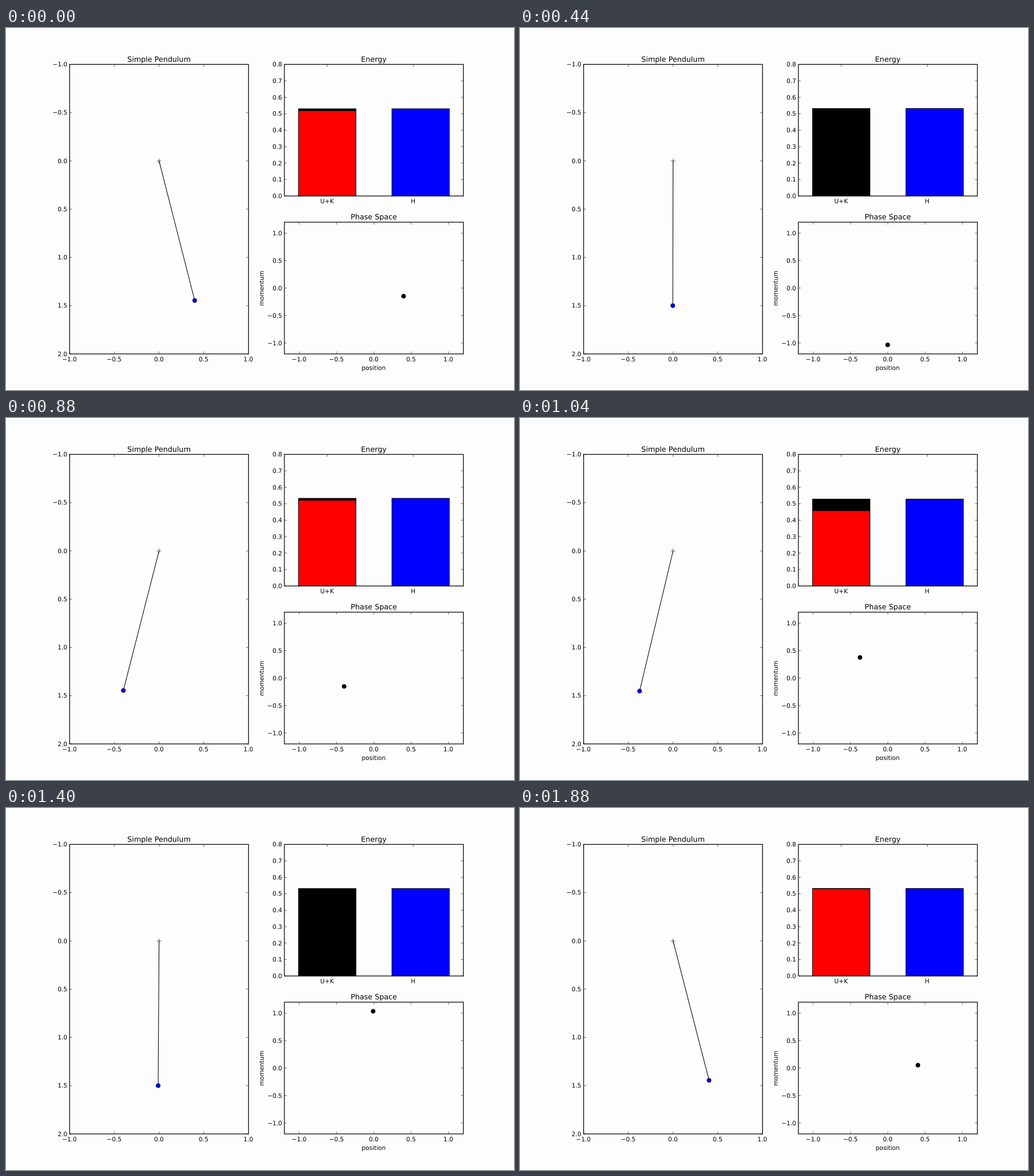
Write an HTML page that moves like this. It is 885 px wide and 632 px high and loops after 1.92 s.

```html
<!DOCTYPE html>
<html lang="en">
<head>
<meta charset="utf-8">
<title>Simple Pendulum</title>
<style>
html, body { margin: 0; width: 100%; height: 100%; overflow: hidden; background: #fdfdfd; }
svg { display: block; }
text { font: 10.6px "DejaVu Sans", sans-serif; text-anchor: middle; text-rendering: geometricPrecision; }
.title { font-size: 12.7px; }
.end { text-anchor: end; }
.box { fill: none; stroke: #000; stroke-width: 1.25; }
.thin { stroke: #000; stroke-width: .6; }
.edge { stroke: #000; stroke-width: 1.06; }
</style>
</head>
<body>
<svg id="stage" width="885" height="632" viewBox="0 0 885 632"></svg>
<script>
const stage = document.getElementById('stage');

function add(tag, attrs, text = '') {
  const el = document.createElementNS('http://www.w3.org/2000/svg', tag);
  set(el, attrs);
  el.textContent = text;
  return stage.appendChild(el);
}
function set(el, attrs) {
  for (const key in attrs) el.setAttribute(key, attrs[key]);
}
const label = (x, y, text, cls = '') => add('text', { x, y, class: cls }, text);
const line = (x1, y1, x2, y2, cls) => add('line', { x1, y1, x2, y2, class: cls });
const number = v => v.toFixed(1).replace('-', '\u2212');
const range = (from, to, step) =>
  Array.from({ length: Math.round((to - from) / step) + 1 }, (_, i) => from + i * step);

// Plot area in pixels with data limits for left, right, top and bottom
function plot(left, right, top, bottom, x0, x1, yTop, yBottom) {
  const X = v => left + (v - x0) / (x1 - x0) * (right - left);
  const Y = v => top + (v - yTop) / (yBottom - yTop) * (bottom - top);
  function axes(title, xTicks, yTicks, names) {
    const size = 4.2;
    xTicks.forEach((v, i) => {
      line(X(v), top, X(v), top + size, 'thin');
      line(X(v), bottom, X(v), bottom - size, 'thin');
      label(X(v) - .3, bottom + (names ? 12.3 : 13), names ? names[i] : number(v));
    });
    yTicks.forEach(v => {
      line(left, Y(v), left + size, Y(v), 'thin');
      line(right, Y(v), right - size, Y(v), 'thin');
      label(left - 4, Y(v) + 3.7, number(v), 'end');
    });
    add('rect', { x: left, y: top, width: right - left, height: bottom - top, class: 'box' });
    label((left + right) / 2 - .1, top - 4.8, title, 'title');
  }
  return { X, Y, axes };
}

const swing = plot(110.8, 422.5, 63.5, 569, -1, 1, -1, 2);
const energy = plot(485, 796.8, 63.5, 293.3, 0, 311.8, .8, 0);
const phase = plot(485, 796.8, 339, 569, -1.2, 1.2, 1.2, -1.2);

const bar = (x, fill) => add('rect', { x: energy.X(x), width: 100, fill, class: 'edge' });
const potential = bar(24.7, '#f00');
const kinetic = bar(24.7, '#000');
const total = bar(187.3, '#00f');

const px = swing.X(0), py = swing.Y(0);
const rod = line(px, py, px, py, 'edge');
line(px - 4.2, py, px + 4.2, py, 'thin');
line(px, py - 4.2, px, py + 4.2, 'thin');
const bob = add('circle', { r: 3.7, fill: '#00f', class: 'thin' });
const state = add('circle', { r: 3.7, class: 'thin' });

swing.axes('Simple Pendulum', range(-1, 1, .5), range(-1, 2, .5));
energy.axes('Energy', [74.6, 224.6], range(0, .8, .1), ['U+K', 'H']);
phase.axes('Phase Space', range(-1, 1, .5), range(-1, 1, .5));
label(640.6, 597, 'position');
add('text', { transform: 'translate(449 454.5) rotate(-90)' }, 'momentum');

const LENGTH = 1.5, REACH = .403, SPEED = 1.035, ENERGY = .5315;

function setBar(el, from, to) {
  set(el, { y: energy.Y(to), height: energy.Y(from) - energy.Y(to) });
}

function draw() {
  const step = Math.floor(performance.now() / 40) % 48;
  const angle = .153 + .12955 * step;
  const lag = angle - .009; // momentum trails slightly, so the total wavers
  const x = REACH * Math.cos(angle);
  const y = Math.sqrt(LENGTH ** 2 - x * x);
  const p = -SPEED * Math.sin(lag);
  const u = ENERGY * Math.cos(angle) ** 2;
  const h = u + ENERGY * Math.sin(lag) ** 2;

  const bx = swing.X(x), by = swing.Y(y);
  set(rod, { x2: bx, y2: by });
  set(bob, { cx: bx, cy: by });
  set(state, { cx: phase.X(x), cy: phase.Y(p) });
  setBar(potential, 0, u);
  setBar(kinetic, u, h);
  setBar(total, 0, h);
  requestAnimationFrame(draw);
}
draw();
</script>
</body>
</html>
```
